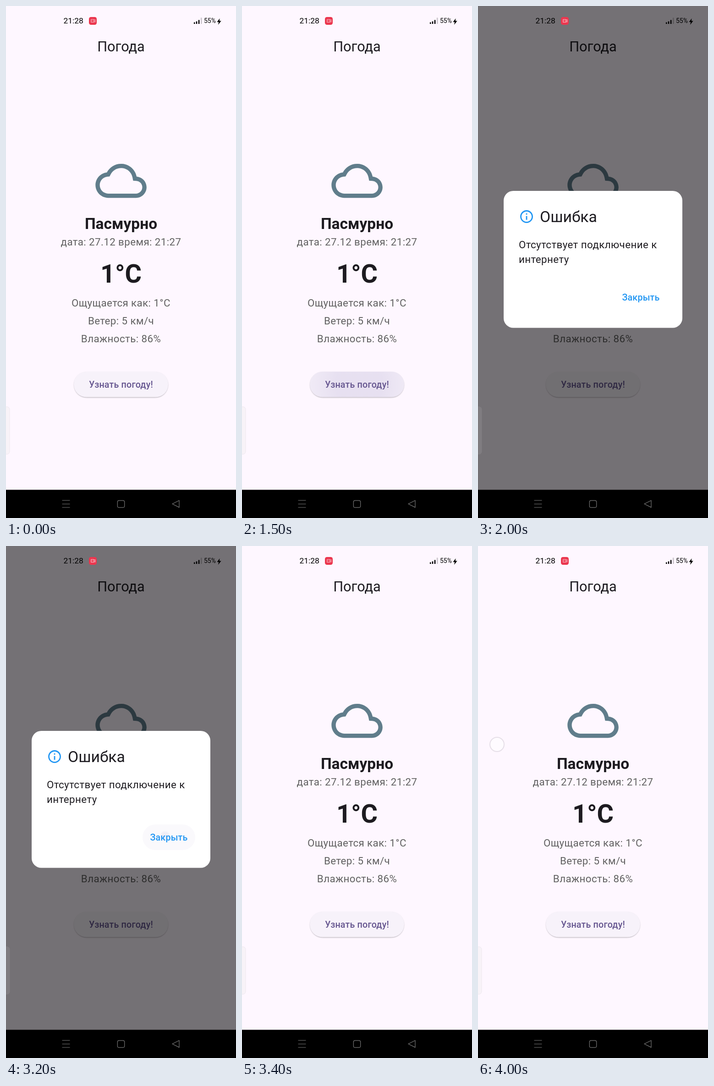
These frames come from a looping animation (502 px wide and 1116 px high, 4100 ms). An HTML page:

```html
<!DOCTYPE html>
<html lang="ru">
<head>
<meta charset="utf-8">
<title>Погода</title>
<style>
  html, body { margin: 0; width: 100%; height: 100%; overflow: hidden; background: #fef7ff; }
  svg { display: block; width: 502px; height: 1116px; font-family: Roboto, sans-serif; }
  .mid { text-anchor: middle; }
  .body { font-size: 22.3px; letter-spacing: .42px; }
  .grey { fill: #616161; }
  .label { font-size: 19.6px; font-weight: 500; letter-spacing: .22px; }
  .ink { fill: #1d1b20; }
</style>
</head>
<body>
<svg viewBox="0 0 502 1116">
  <defs>
    <radialGradient id="glow" gradientUnits="userSpaceOnUse" cx="256" cy="825" r="130">
      <stop offset=".4" stop-color="#6750a4" stop-opacity=".11"/>
      <stop offset="1" stop-color="#6750a4" stop-opacity=".02"/>
    </radialGradient>
    <filter id="soft" x="-10%" y="-20%" width="120%" height="150%">
      <feGaussianBlur stdDeviation="1.2"/>
    </filter>
  </defs>

  <rect width="502" height="1116" fill="#fef7ff"/>

  <g id="page">
    <text class="mid ink" x="251" y="99" font-size="30.7">Погода</text>
    <path transform="translate(195.3 325.3) scale(4.646)" fill="#607d8b" d="M19.35 10.04C18.67 6.59 15.64 4 12 4 9.11 4 6.6 5.64 5.35 8.04 2.34 8.36 0 10.91 0 14c0 3.31 2.69 6 6 6h13c2.76 0 5-2.24 5-5 0-2.64-2.05-4.78-4.65-4.96zM19 18H6c-2.21 0-4-1.79-4-4 0-2.05 1.53-3.76 3.56-3.97l1.07-.11.5-.95C8.08 7.14 9.94 6 12 6c2.62 0 4.88 1.86 5.39 4.43l.3 1.5 1.53.11c1.56.1 2.78 1.41 2.78 2.96 0 1.65-1.35 3-3 3z"/>
    <text class="mid ink" x="251" y="486" font-size="33.5" font-weight="700">Пасмурно</text>
    <text class="mid body grey" x="251" y="522">дата: 27.12 время: 21:27</text>
    <text class="mid ink" x="251" y="603" font-size="55.8" font-weight="700">1°C</text>
    <text class="mid body grey" x="251" y="654.5">Ощущается как: 1°C</text>
    <text class="mid body grey" x="251" y="693.5">Ветер: 5 км/ч</text>
    <text class="mid body grey" x="251" y="732.5">Влажность: 86%</text>

    <rect x="148.5" y="798.5" width="205" height="55" rx="27.5" opacity=".3" filter="url(#soft)"/>
    <rect x="148" y="797" width="206" height="55.5" rx="27.7" fill="#f7f2fa"/>
    <rect id="press" x="148" y="797" width="206" height="55.5" rx="27.7" fill="url(#glow)"/>
    <text class="mid label" x="251" y="831.5" fill="#65558f">Узнать погоду!</text>
  </g>

  <rect id="scrim" width="502" height="1055"/>

  <rect id="tab" x="-10" y="873.5" width="18" height="103.5" rx="6"/>

  <g id="dialog">
    <rect x="56" y="403" width="390" height="298.5" rx="21" fill="#fff"/>
    <path transform="translate(89.3 442.3) scale(1.394)" fill="#2196f3" d="M11 7h2v2h-2zm0 4h2v6h-2zm1-9C6.48 2 2 6.48 2 12s4.48 10 10 10 10-4.48 10-10S17.52 2 12 2zm0 18c-4.41 0-8-3.59-8-8s3.59-8 8-8 8 3.59 8 8-3.59 8-8 8z"/>
    <text class="ink" x="135" y="470.5" font-size="33.7">Ошибка</text>
    <text class="body ink" x="89" y="527.5">Отсутствует подключение к</text>
    <text class="body ink" x="89" y="559.5">интернету</text>
    <rect id="hover" x="298" y="607" width="115" height="55.8" rx="27.9" fill="#6750a4"/>
    <circle id="splash" cx="347" cy="632" r="10" fill="#6750a4" filter="url(#soft)"/>
    <text class="mid label" x="355.5" y="641.5" fill="#2196f3">Закрыть</text>
  </g>

  <g id="status">
    <text x="125.5" y="38" font-size="17.4">21:28</text>
    <rect x="181" y="24" width="17" height="17" rx="4.5" fill="#eb374f"/>
    <path d="M185.7 29.3h6v6.2h-6zM191.7 31.2l3-1.5v5.4l-3-1.5M188 31.2v2.2" fill="none" stroke="#fff" stroke-opacity=".8" stroke-width=".9"/>
    <path d="M410 35.5h2.4V39H410zM414.7 33.5h2.6V39h-2.6zM419.8 30.5h2.6V39h-2.6z"/>
    <path d="M425 25.5h2.4V39H425z" fill-opacity=".22"/>
    <text x="432" y="36.5" font-size="14">55%</text>
    <path d="M466.5 27l-6 8h3.8l-1.3 6 6.7-8.5h-3.9z"/>
  </g>

  <circle id="touch" cx="41.5" cy="432.5" r="15.5" fill="#fff" fill-opacity=".45" stroke="#e6dfe8" stroke-width="2"/>

  <rect y="1054.5" width="502" height="61.5"/>
  <g fill="none" stroke="#777" stroke-width="1.2">
    <path d="M122.5 1077.5h17M122.5 1085.5h17M122.5 1093h17"/>
    <rect x="243.3" y="1077.8" width="15.4" height="15.4" rx="3.5"/>
    <path d="M363 1085.3l15-7.6v15.2z" stroke-linejoin="round"/>
  </g>
</svg>
<script>
const LOOP = 4100;
const $ = id => document.getElementById(id);

// Each pair is [start ms, value held from then on].
const tracks = {
  press:  [[0, 0], [1400, .35], [1500, 1], [1700, .5], [1800, .2], [1900, 0]],
  scrim:  [[0, 0], [1600, .525], [1700, .54], [3300, .4], [3400, 0]],
  dialog: [[0, 0], [1600, .935], [1700, 1], [3300, .61], [3400, 0]],
  hover:  [[0, 0], [3200, .035], [3300, .14], [3400, 0]],
  splash: [[0, 0], [3200, .06], [3300, 0]],
  touch:  [[0, 0], [4000, 1]]
};

const held = (keys, t) => keys.reduce((v, [at, next]) => t >= at ? next : v, 0);

function draw(t) {
  for (const id in tracks) $(id).setAttribute('opacity', held(tracks[id], t));
  const dim = held(tracks.scrim, t) > 0;
  $('tab').setAttribute('fill', dim ? 'rgba(255,255,255,.08)' : '#f8f3f8');
  $('tab').setAttribute('stroke', dim ? 'rgba(255,255,255,.06)' : '#eee8ef');
  $('glow').setAttribute('r', t < 1500 ? 70 : 130);
}

const start = performance.now();
function tick() {
  draw((performance.now() - start) % LOOP);
  requestAnimationFrame(tick);
}
draw(0);
requestAnimationFrame(tick);
</script>
</body>
</html>
```
